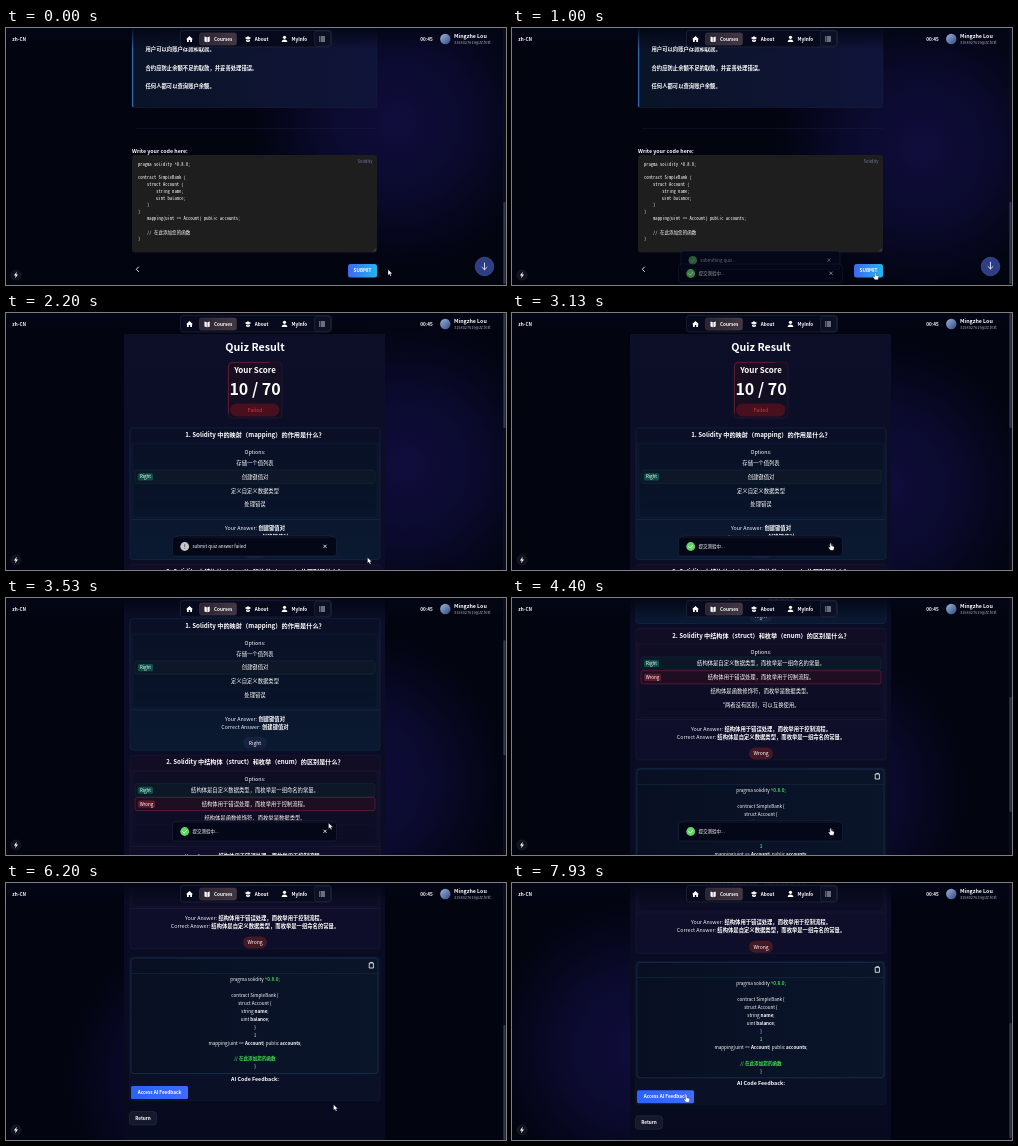
An HTML page for the animation above (8000 ms loop, 500x257 px).

```html
<!DOCTYPE html>
<html lang="zh-CN">
<head>
<meta charset="utf-8">
<title>Quiz</title>
<style>
  html, body { margin: 0; width: 100%; height: 100%; overflow: hidden; background: #02040f; }
  svg { display: block; width: 100%; height: 100%; font: 500 5px "Noto Sans CJK SC", "Noto Sans CJK", "Noto Sans", sans-serif; }
  text { white-space: pre; }
  .mono { font-family: "Noto Sans Mono CJK SC", "Noto Sans CJK SC", monospace; }
  .b { font-weight: 700; }
  .g { fill: #3ee052; }
</style>
</head>
<body>
<svg id="stage" viewBox="0 0 500 257"></svg>
<script>
const LOOP = 8000, REM = 5.33, SMALL = 4.67;

// Markup helpers; text is placed by its vertical centre.
const rect = (x, y, w, h, fill, extra = '') =>
  `<rect x="${x}" y="${y}" width="${w}" height="${h}" fill="${fill}" ${extra}/>`;
const box = (x, y, w, h, fill, stroke, r = 3) =>
  rect(x, y, w, h, fill, `rx="${r}" stroke="${stroke}" stroke-width=".5"`);
const text = (s, x, y, size = REM, fill = '#fff', extra = '') =>
  `<text x="${x}" y="${y + size * 0.36}" font-size="${size}" fill="${fill}" ${extra}>${s}</text>`;
const mid = (s, y, size, fill, extra = '', x = 249) =>
  text(s, x, y, size, fill, `text-anchor="middle" ${extra}`);
const line = (d, stroke = '#fff', w = 0.8) =>
  `<path d="${d}" fill="none" stroke="${stroke}" stroke-width="${w}" stroke-linecap="round" stroke-linejoin="round"/>`;
const shape = (d, fill = '#fff') => `<path d="${d}" fill="${fill}"/>`;
const group = (id, body, extra = '') => `<g id="${id}" ${extra}>${body}</g>`;
const BOLD = 'class="b"';
const bold = s => `<tspan class="b" fill="#fff">${s}</tspan>`;
const green = s => `<tspan class="b g">${s}</tspan>`;

const linear = (id, a, b, dir = 'x2="1" y2="0"') =>
  `<linearGradient id="${id}" x1="0" y1="0" ${dir}><stop stop-color="${a}"/><stop offset="1" stop-color="${b}"/></linearGradient>`;

const defs = `<defs>
  <radialGradient id="glow"><stop stop-color="#100d3c"/><stop offset=".5" stop-color="#0c0b32" stop-opacity=".85"/><stop offset="1" stop-color="#0a0a2c" stop-opacity="0"/></radialGradient>
  ${linear('veil', 'rgba(3,6,22,.95)', 'rgba(3,6,22,0)', 'x2="0" y2="1"')}
  ${linear('brief', '#0a1427', '#11143a')}
  ${linear('submit', '#3d68f2', '#22b6ee')}
  ${linear('access', '#2a62fa', '#3f6cff')}
  ${linear('tab', '#2a2433', '#443742')}
  ${linear('panel', '#0d0f29', '#070a1f', 'x2="0" y2="1"')}
  ${linear('blue', '#0c1329', '#0a1931', 'x2="0" y2="1"')}
  ${linear('plum', '#160f28', '#0d0e2a', 'x2="0" y2="1"')}
  ${linear('code', '#080f23', '#0a1529')}
  ${linear('score', '#1d0e20', '#0b1024', 'x2="1" y2="1"')}
  ${linear('face', '#9fb4d8', '#2f4a86', 'x2="1" y2="1"')}
</defs>`;

const backdrop = rect(0, 0, 500, 257, '#02040f')
  + '<circle id="orb" r="150" fill="url(#glow)"/>';

// Coding task
const source = [
  [0, 'pragma solidity ^0.8.0;'], [], [0, 'contract SimpleBank {'], [1, 'struct Account {'],
  [2, 'string name;'], [2, 'uint balance;'], [1, '}'], [0, '}'],
  [1, 'mapping(uint =&gt; Account) public accounts;'], [], [1, '// 在此添加您的函数'], [0, '}']
];
const task = box(126, -10, 245, 89.5, 'url(#brief)', '#17233d')
  + rect(126, -10, 1.3, 89, '#3565b5')
  + ['用户可以向账户存款和取款。', '合约应防止余额不足的取款，并妥善处理错误。', '任何人都可以查询账户余额。']
    .map((s, i) => text(s, 139.5, 21.5 + i * 18.5, REM, '#fff', BOLD)).join('')
  + rect(130, 100, 240, 0.5, '#171d38')
  + text('Write your code here:', 126, 123, REM, '#fff', BOLD)
  + rect(126, 127, 245, 97.5, '#1e1e1e', 'rx="3"')
  + text('Solidity', 351.5, 133.5, 4.2, '#73799c')
  + source.map(([tab, s], i) => s ? text(s, 132 + tab * 9.1, 136 + i * 6.8, 4.55, '#fff', 'class="mono"') : '').join('')
  + line('M367.5 223l2-2M369 223l.5-.5', '#888', 0.4)
  + line('M132.5 239l-2.2 2.3 2.2 2.3', '#fff', 0.9)
  + rect(342, 236, 29, 13.5, 'url(#submit)', 'rx="2.5"')
  + mid('SUBMIT', 242.7, SMALL, '#fff', BOLD, 356.5)
  + '<circle cx="478.5" cy="238.5" r="9.3" fill="#2d3d86" stroke="#5268b4" stroke-width=".5"/>'
  + group('arrow', line('M478.5 235v6.5M476 239.3l2.5 2.4 2.5-2.4', '#fff', 0.8));

// Quiz result
const badge = (s, x, y, w, fill) =>
  group('', rect(x, y - 3.6, w, 7.2, fill, 'rx="1.5"'), 'class="badge"') + mid(s, y, 4.5, '#fff', '', x + w / 2);
const pill = (s, y, fill) => rect(237, y - 6, 24, 12, fill, 'rx="6"') + mid(s, y, 5);

function question(y, fill, edge, title, size, rows, marks, answers) {
  const row = i => y + 35 + i * 13.8;
  const tone = { Right: ['#0d1728', '#15303a', '#0e4f48'], Wrong: ['#1f0e22', '#8a2540', '#5e1a2d'] };
  return box(124, y, 250, 131.5, fill, edge)
    + rect(124.3, y + 0.3, 249.4, 14, '#0a0b20', 'rx="3" opacity=".35"')
    + box(127, y + 16, 244, 73, 'rgba(3,8,24,.25)', 'rgba(80,110,160,.12)')
    + rect(124.5, y + 91, 249, 0.5, edge)
    + mid(title, y + 7, size, '#fff', BOLD)
    + mid('Options:', y + 24, REM)
    + rows.map((s, i) => {
      const m = marks[i], [bg, rim, tag] = tone[m] || [];
      return (m ? box(129, row(i) - 6.6, 240, 13.2, bg, rim, 2)
        + badge(m, 132, row(i), m === 'Right' ? 15 : 17, tag)
        : rect(130, row(i) + 6.8, 238, 0.3, '#1a2740', 'opacity=".5"')) + mid(s, row(i), REM);
    }).join('')
    + mid('Your Answer: ' + bold(answers[0]), y + 100.5, REM, '#eceff6')
    + mid('Correct Answer: ' + bold(answers[1]), y + 108.7, REM, '#eceff6');
}

const listing = [
  `pragma solidity ${green('^0.8.0')};`, '', 'contract SimpleBank {', 'struct Account {',
  `string ${bold('name')};`, `uint ${bold('balance')};`, '}', green('1'),
  `mapping(uint =&gt; ${bold('Account')}) public ${bold('accounts')};`, '', green('// 在此添加您的函数'), '}'
];
const structAnswer = '结构体是自定义数据类型，而枚举是一组命名的常量。';
const structWrong = '结构体用于错误处理，而枚举用于控制流程。';

const scoreCard = box(222, 49, 54, 56, 'url(#score)', '#3d1928', 4)
  + line('M222.5 100V54q0-4.5 4.5-4.5h36', '#8d2438', 0.5)
  + mid('Your Score', 57, 8, '#fff', BOLD)
  + mid('10 / 70', 76, 16, '#fff', BOLD)
  + rect(224, 90.5, 49.5, 13, '#480f1f', 'rx="6.5"')
  + mid('Failed', 97, REM, '#e3323f');

const results = rect(118, 21, 261, 560, 'url(#panel)')
  + group('body',
    group('heading', mid('Quiz Result', 34, 10.67, '#fff', BOLD))
    + group('score', scoreCard)
    + question(115, 'url(#blue)', '#14304e', '1. Solidity 中的映射（mapping）的作用是什么？', 6.2,
      ['存储一个值列表', '创建键值对', '定义自定义数据类型', '处理错误'], { 1: 'Right' }, ['创建键值对', '创建键值对'])
    + pill('Right', 239, '#16213d')
    + question(251.5, 'url(#plum)', '#231a3a', '2. Solidity 中结构体（struct）和枚举（enum）的区别是什么？', 6.15,
      [structAnswer, structWrong, '结构体是函数修饰符，而枚举是数据类型。', '"两者没有区别，可以互换使用。'],
      { 0: 'Right', 1: 'Wrong' }, [structWrong, structAnswer])
    + pill('Wrong', 376.5, '#451826')
    + box(123.5, 391, 250.5, 143.5, '#0a1126', '#111c36')
    + box(125, 392, 247, 115.5, 'url(#code)', '#234560')
    + rect(125, 407, 247, 0.5, '#1b2e49')
    + line('M363.6 397h3.8v5h-3.8zM364.7 396.4h1.6', '#fff', 0.8)
    + listing.map((s, i) => mid(s, 413.5 + i * 7.93, 4.6)).join('')
    + mid('AI Code Feedback:', 513, REM, '#fff', BOLD)
    + rect(125, 520, 57, 13, 'url(#access)', 'rx="1.5"')
    + mid('Access AI Feedback', 526.5, SMALL, '#fff', BOLD, 153.5)
    + box(123.5, 545.5, 27, 13.5, '#141a2c', '#29324a')
    + mid('Return', 552, SMALL, '#fff', BOLD, 137));

// Fixed header and corners
const header = rect(0, 0, 497, 22, 'url(#veil)')
  + box(174.5, 2.3, 151, 16.7, '#070a1d', '#2b3046')
  + box(193.5, 5, 37, 12, 'url(#tab)', '#453f4b', 2)
  + box(308.5, 3, 16, 15.3, '#0c1024', '#2b3046', 2.5)
  + shape('M180 11.2l3.5-3.2 3.5 3.2h-1v2.8h-1.8v-2h-1.4v2H181v-2.8z')
  + shape('M198.5 8.6l2.3.6v5l-2.3-.6zM203.7 8.6l-2.3.6v5l2.3-.6z')
  + shape('M238.8 10l3.2-1.8 3.2 1.8-3.2 1.8zM240 11.4l2 1.1 2-1.1v1.8q-2 1.4-4 0z')
  + '<circle cx="278.5" cy="9.3" r="1.6" fill="#fff"/>' + shape('M275.7 14q0-2.6 2.8-2.6t2.8 2.6z')
  + line('M315 9h3.6M315 11h3.6M315 13h3.6M313.4 9h.1M313.4 11h.1M313.4 13h.1', '#fff', 0.8)
  + [['Courses', 208], ['About', 248.7], ['MyInfo', 285.5], ['zh-CN', 6.3], ['00:45', 414.3]]
    .map(([s, x]) => text(s, x, 11, SMALL, '#fff', BOLD)).join('')
  + '<circle cx="439.3" cy="11" r="5.2" fill="url(#face)"/>'
  + text('Mingzhe Lou', 448, 8.4, REM, '#fff', BOLD)
  + text('3158027619@zz.test', 448, 14.3, 3.9, '#a3a9b8')
  + '<circle cx="10" cy="247" r="5" fill="#10131d" stroke="#2c303c" stroke-width=".4"/>'
  + shape('M10.8 243.8l-2.9 3.8h1.8l-.6 2.7 2.9-3.8h-1.8z')
  + rect(497, 0, 3, 257, '#0b0e1a') + rect(497.4, 0, 2.2, 100, '#343a4c', 'id="thumb" rx="1"');

// Toasts, oldest first
const tick = '<circle cx="178.7" cy="233.5" r="4.4" fill="#5fd862"/>' + line('M176.7 233.6l1.5 1.5 2.6-2.9', '#fff', 0.9);
const info = '<circle cx="178.7" cy="233.5" r="4.4" fill="#c9c6c8"/>' + line('M178.7 231.5v2.3M178.7 235.4v.1', '#555', 0.8);
const toasts = [
  { label: 'submitting quiz...', icon: tick, from: [450, 850], to: [5250, 5500] },
  { label: '提交测验中...', icon: tick, from: [930, 1200], to: [4450, 4720] },
  { label: 'submit quiz answer failed', icon: info, from: [1480, 1750], to: [2800, 3060] }
];
const toastLayer = toasts.map((n, i) => group('toast' + i,
  box(166.5, 224, 164, 19, '#040718', '#222a40') + group('note' + i,
    n.icon + text(n.label, 186.5, 233.5, 4.5)
    + line('M317.7 232l2.6 2.6M320.3 232l-2.6 2.6', '#fff', 0.8)))).join('');
const tooltip = group('tip', rect(312.5, 219, 13.5, 8, '#000', 'rx="1.5"') + mid('Hide', 223, 4, '#fff', '', 319.2));

const pointer = group('pointer',
  '<path id="point" d="M0 0v5.8l1.4-1.2 1 2.1 1-.5-.9-2h1.9z" fill="#fff" stroke="#000" stroke-width=".3"/>'
  + '<path id="hand" d="M1 .6q.8-.8 1.3 0v2.2l2.4.6q.7.3.5 1.2l-.6 2.6H1.4L-.6 4.6q0-.9.8-.6l.8.6z" fill="#fff" stroke="#000" stroke-width=".3"/>');

const stage = document.getElementById('stage');
stage.innerHTML = defs + backdrop + group('task', task) + group('results', results) + header + toastLayer + tooltip + pointer;
const el = Object.fromEntries([...stage.querySelectorAll('[id]')].map(n => [n.id, n]));
const badges = [...stage.querySelectorAll('.badge')];

const unit = (t, a, b) => Math.min(1, Math.max(0, (t - a) / (b - a)));
const ease = (t, a, b) => 1 - (1 - unit(t, a, b)) ** 3;
const smooth = p => p * p * (3 - 2 * p);

function track(keys, t, curve = p => p) {
  const i = keys.findIndex(k => k[0] > t);
  if (i < 0) return keys[keys.length - 1].slice(1);
  if (i === 0) return keys[0].slice(1);
  const a = keys[i - 1], b = keys[i], p = curve((t - a[0]) / (b[0] - a[0]));
  return a.slice(1).map((v, j) => v + (b[j + 1] - v) * p);
}

const scrollKeys = [[3200, 0], [3530, 94], [4000, 221], [5350, 221], [5730, 288], [6200, 317]];
const pointerKeys = [
  [70, 382, 241.5], [400, 361.5, 244.5], [2330, 361.5, 244.5], [2720, 317, 230], [3130, 317, 230],
  [3400, 322.5, 225], [4070, 322.5, 225], [4350, 317, 230], [5350, 317, 230], [5750, 327.5, 221.5],
  [7070, 327.5, 221.5], [7290, 255, 150], [7450, 190, 112], [7670, 128, 233], [7870, 172.5, 212]
];
const handSpans = [[360, 1470], [2700, 3150], [4300, 5350], [7800, LOOP]];

const show = (node, on) => node.setAttribute('visibility', on ? 'visible' : 'hidden');
const move = (node, x, y) => node.setAttribute('transform', `translate(${x} ${y})`);
const fade = (node, v) => node.setAttribute('opacity', v);

function draw(t) {
  const onTask = t < 1470;
  const scroll = t >= 7930 ? 312.7 : track(scrollKeys, t)[0];
  show(el.task, onTask);
  show(el.results, !onTask);
  const angle = -0.5 + 3.1 * t / LOOP;
  move(el.orb, 255 + 155 * Math.cos(angle), 128 + 70 * Math.sin(angle));
  move(el.arrow, 0, Math.sin(Math.min(t, 1200) / 1200 * Math.PI * 4) * 0.9);
  move(el.results, 0, -scroll);
  el.thumb.setAttribute('y', onTask ? 174 : scroll * 257 / 574);
  el.thumb.setAttribute('height', onTask ? 82 : 115);

  const enter = ease(t, 1500, 1950), pop = ease(t, 1680, 2150), size = 0.8 + 0.2 * pop;
  fade(el.body, enter);
  move(el.heading, 0, -15 * (1 - enter));
  fade(el.score, pop);
  el.score.setAttribute('transform', `translate(249 77) scale(${size}) translate(-249 -77)`);
  badges.forEach(b => fade(b, pop));

  toasts.forEach((n, i) => {
    const rise = ease(t, ...n.from), leave = ease(t, ...n.to), next = toasts[i + 1];
    const covered = next ? ease(t, ...next.from) * (1 - ease(t, ...next.to)) : 0;
    const y = 233.5 + 30 * (1 - rise) + 24 * leave - 2 * covered;
    el['toast' + i].setAttribute('transform', `translate(248.5 ${y}) scale(${1 - 0.05 * covered}) translate(-248.5 -233.5)`);
    fade(el['toast' + i], rise * (1 - leave));
    fade(el['note' + i], 1 - covered);
  });
  show(el.tip, t >= 4930 && t < 5250);

  const hand = handSpans.some(([a, b]) => t >= a && t < b);
  show(el.hand, hand);
  show(el.point, !hand);
  move(el.pointer, ...track(pointerKeys, t, smooth));
}

function frame() {
  draw(performance.now() % LOOP);
  requestAnimationFrame(frame);
}
frame();
</script>
</body>
</html>
```
